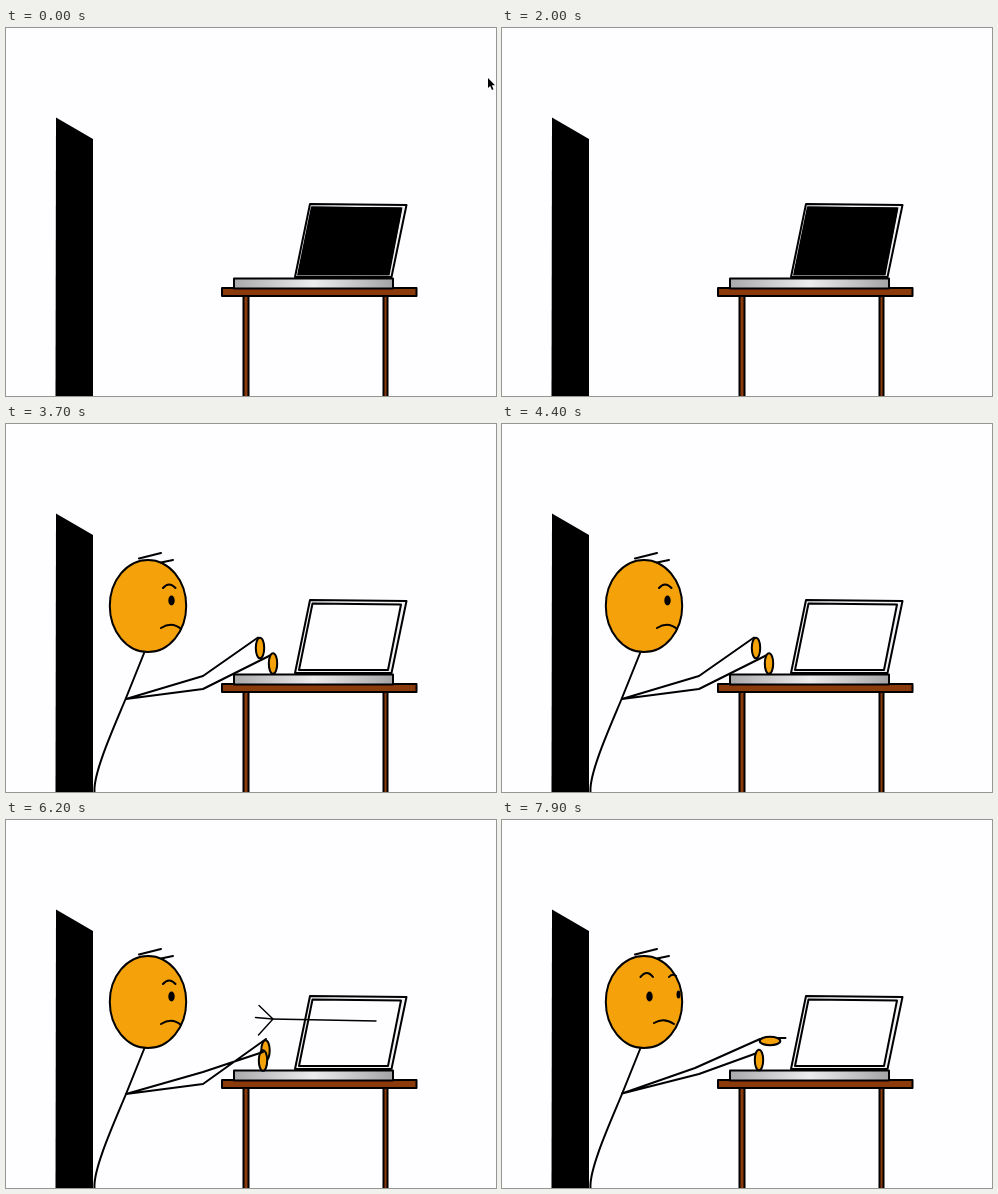
An HTML page without scripts for the animation above (8 s loop, 490x368 px).

```html
<!DOCTYPE html>
<html lang="en">
<head>
<meta charset="utf-8">
<title>At the laptop</title>
<style>
html, body { margin: 0; width: 100%; height: 100%; overflow: hidden; background: #fefdff; }
svg { display: block; width: 490px; height: 368px; }

.ink { fill: none; stroke: #000; stroke-width: 2; stroke-linecap: round; stroke-linejoin: round; }
.thin { stroke-width: 1.4; }
.skin { fill: #f5a10a; }
.wood { fill: #8b3a0c; }
.dot { fill: #000; stroke: none; }

/* the small negative delay keeps hard cuts clear of the 100 ms grid */
.cut { animation: 8s step-end -20ms infinite; }
.key { animation: 1s step-end -20ms infinite; }

.cursor { animation-name: cursor; }
.off { animation-name: off; }
.man { animation-name: man; }
.typing, .side { opacity: 1; }
.typing { animation-name: typing; }
.point { animation-name: point; }
.side { animation-name: side; }
.front { animation-name: front; }
.open { animation-name: open; }
.curl { animation-name: curl; }
.up { animation-name: up; }
.down { animation-name: down; }
.mid { animation-name: mid; }
.reach { animation: reach 8s -20ms infinite; }

@keyframes cursor {
  0% { transform: translate(482px, 50px); }
  11.25% { transform: translate(415px, 37px); }
  12.5% { transform: translate(325px, 19px); }
  13.75% { transform: translate(245px, 4px); }
  16.25% { transform: translate(222px, 9px); }
  17.5% { transform: translate(188px, 12px); }
  18.75% { transform: translate(152px, 12px); }
  20% { transform: translate(115px, 10px); }
  21.25% { transform: translate(78px, 7px); }
  22.5% { transform: translate(43px, 3px); }
  23.75% { transform: translate(13px, 0); }
  25%, 100% { transform: translate(-20px, -20px); }
}
@keyframes off { 0% { opacity: 1; } 36.25%, 100% { opacity: 0; } }
@keyframes man { 0% { opacity: 0; } 33.75%, 100% { opacity: 1; } }
@keyframes typing { 0% { opacity: 1; } 92.5%, 100% { opacity: 0; } }
@keyframes point { 0% { opacity: 0; } 92.5%, 100% { opacity: 1; } }
@keyframes side { 0% { opacity: 1; } 97.5%, 100% { opacity: 0; } }
@keyframes front { 0% { opacity: 0; } 97.5%, 100% { opacity: 1; } }
@keyframes open { 0% { opacity: 1; } 83.75%, 100% { opacity: 0; } }
@keyframes curl { 0% { opacity: 0; } 83.75%, 100% { opacity: 1; } }
@keyframes up { 0%, 20%, 50%, 90%, 100% { opacity: 0; } 10%, 40%, 70% { opacity: 1; } }
@keyframes down { 0%, 30%, 60%, 100% { opacity: 0; } 20%, 50%, 90% { opacity: 1; } }
@keyframes mid { 0%, 30%, 60%, 100% { opacity: 1; } 10%, 40%, 70% { opacity: 0; } }
@keyframes reach {
  0% { transform: translateX(124px); }
  56.25% { transform: translateX(124px); animation-timing-function: steps(2); }
  58.75% { transform: translateX(60px); animation-timing-function: steps(2); }
  61.25% { transform: translateX(124px); }
  70% { transform: translateX(124px); animation-timing-function: steps(6); }
  77.5% { transform: none; }
  87.5% { transform: none; animation-timing-function: steps(4); }
  92.5%, 100% { transform: translateX(124px); }
}
</style>
</head>
<body>
<svg viewBox="0 0 490 368">
  <defs>
    <linearGradient id="metal">
      <stop offset="0" stop-color="#a9a9ab"/>
      <stop offset=".5" stop-color="#ececee"/>
      <stop offset="1" stop-color="#a4a4a6"/>
    </linearGradient>
    <clipPath id="edge"><path d="M240 130H371V240H240Z"/></clipPath>
    <ellipse id="hand" class="ink skin" rx="4.2" ry="10.3"/>
  </defs>

  <path d="M50 89.500L87 111V368H49.500Z"/>

  <g class="ink">
    <path class="wood" d="M237.500 267H242.500V370H237.500ZM377.500 267H381.500V370H377.500Z"/>
    <path class="wood" d="M216 260H410.500V268H216Z"/>
    <path fill="url(#metal)" d="M228 250.500H387V260.500H228Z"/>
    <path fill="#f3f3f6" d="M304 176L400.500 177L385.500 249H289Z"/>
    <path fill="#fefdff" d="M306.500 179.500L395 180.500L382 246H293Z"/>
  </g>
  <path class="cut off" d="M305 178.500L396.500 179.500L383.500 247.500H291Z"/>

  <g class="cut man">
    <g class="ink">
      <path d="M138.500 228L120 274C108 303 87 349 88.500 368"/>
      <ellipse class="skin" cx="142" cy="182" rx="38.200" ry="46"/>
      <path d="M133 134.500L155 129M155 138.500L167 136"/>
    </g>

    <g class="cut side ink">
      <path d="M157 164Q163 157 169.500 164M155 204Q166 197 175 205"/>
      <ellipse class="dot" cx="165.500" cy="176.500" rx="3.200" ry="5"/>
    </g>
    <g class="cut front ink">
      <path d="M138.500 157Q145 149 151 157M167 157Q170 153 174 156M152 203Q162 197 172 204"/>
      <ellipse class="dot" cx="147.500" cy="176.500" rx="3.200" ry="5"/>
      <ellipse class="dot" cx="176.500" cy="174.500" rx="2" ry="4"/>
    </g>

    <g class="cut typing">
      <g class="key up">
        <path class="ink" d="M252 213.500L197 252L120 275L197 265L267 230"/>
        <use href="#hand" x="254" y="224"/>
        <use href="#hand" x="267" y="239.500"/>
      </g>
      <g class="key down">
        <use href="#hand" x="259.500" y="230.500"/>
        <use href="#hand" x="257" y="240.500"/>
        <path class="ink" d="M260 219L197 264L120 274L197 252L257 232"/>
      </g>
      <g class="key mid">
        <path class="ink" d="M256 217L197 257L120 274.500L197 259L262 231"/>
        <use href="#hand" x="256.500" y="227"/>
        <use href="#hand" x="262" y="240"/>
      </g>
    </g>
    <g class="cut point">
      <path class="ink" d="M258 219L193 248L120 273.500L197 254L255 233M270 218H283.500"/>
      <use href="#hand" transform="translate(268 221) rotate(90)"/>
      <use href="#hand" x="257" y="240"/>
    </g>
  </g>

  <g clip-path="url(#edge)">
    <g class="reach ink thin">
      <path d="M266 199L370 201"/>
      <path class="cut open" d="M253 185.500L267 199L249.500 197.500M267 199L252.500 215"/>
      <path class="cut curl" d="M256 189.500Q256 199 266 199M252 197Q257 204 265 202.500M267 199Q268 208 264.500 211Q258 211 253.500 208.500"/>
    </g>
  </g>

  <path class="cut cursor" d="M0 0V10L2.200 8L4 12L5.500 11.300L3.800 7.300H7Z"/>
</svg>
</body>
</html>
```
